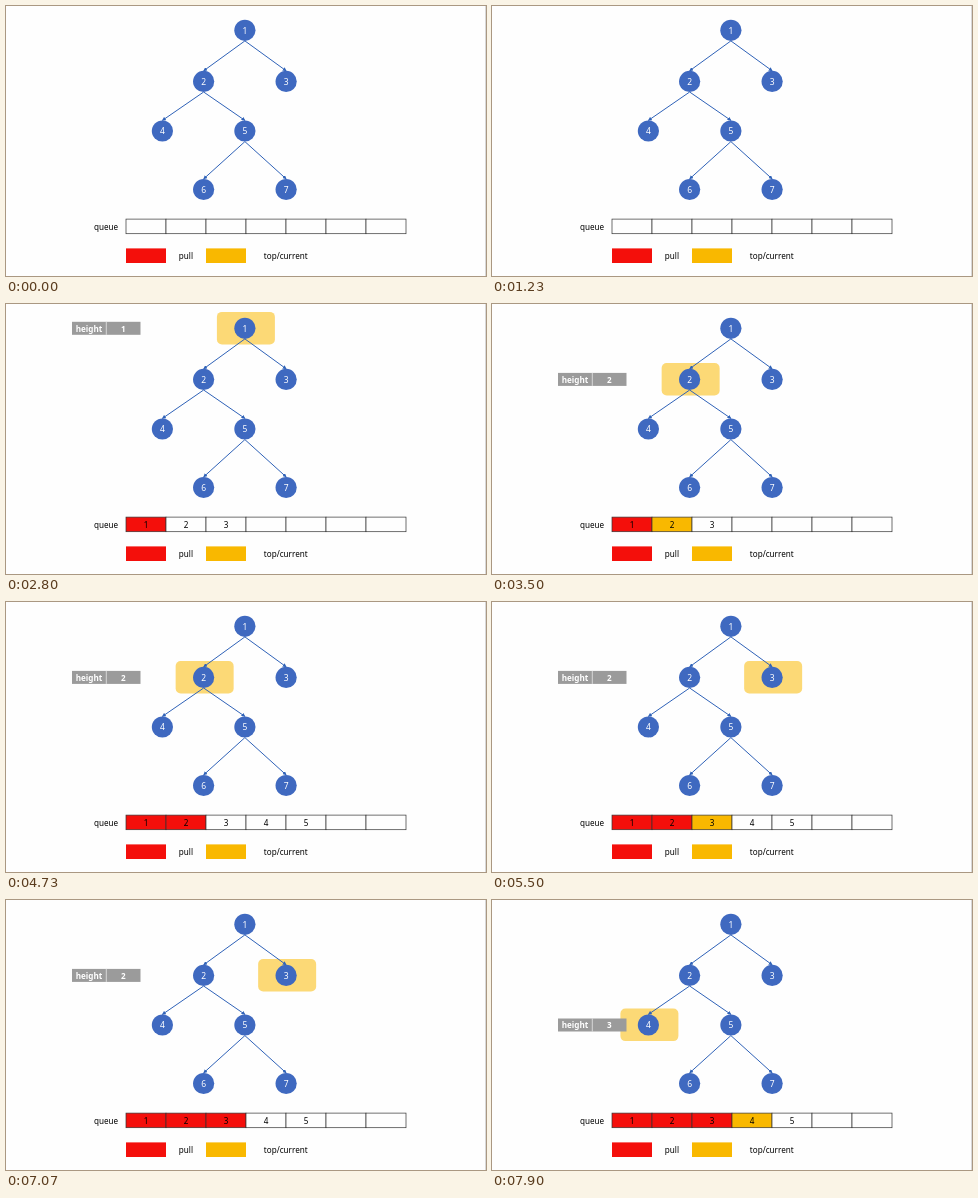
An HTML page for the animation above (8 s loop, 480 px wide and 270 px high).

```html
<!DOCTYPE html>
<html lang="en">
<head>
<meta charset="utf-8">
<title>Level-order traversal</title>
<style>
  html, body { margin: 0; width: 100%; height: 100%; overflow: hidden; background: #fefefe; }
  svg { display: block; width: 100vw; height: 100vh; font: 8.15px "Noto Sans", "Open Sans", sans-serif; }
  .mid { text-anchor: middle; }
  .node circle { fill: #3f69c0; }
  .node text { fill: #fff; font-size: 8.5px; }
  .edge { stroke: #2f62b8; stroke-width: 1; marker-end: url(#tip); }
  .cell rect { stroke: #333; stroke-width: .7; }
  .pulled { fill: #f40f0b; }
  .current { fill: #f9b800; }
  .waiting { fill: #fefefe; }
  #height rect { fill: #9b9b9b; }
  #height path { stroke: #e8e8e8; stroke-width: .8; }
  #height text { fill: #fff; font-weight: bold; }
</style>
</head>
<body>
<svg viewBox="0 0 480 270">
  <defs>
    <marker id="tip" markerUnits="userSpaceOnUse" markerWidth="4" markerHeight="4" refX="3.4" refY="2" orient="auto">
      <path d="M0 0L4 2L0 4Z" fill="#2f62b8"/>
    </marker>
  </defs>
  <rect x="479" width="1" height="270" fill="#d8d8d8"/>
  <g id="visit">
    <rect id="focus" y="-16.4" width="58" height="32.5" rx="5" fill="#fcd976"/>
  </g>
  <g id="tree"></g>
  <g id="height">
    <rect x="66" y="-6.5" width="68.5" height="13"/>
    <path d="M100.3 -6.5v13"/>
    <text class="mid" x="83" y="3.2">height</text>
    <text class="mid" id="level" x="117.3" y="3.2"></text>
  </g>
  <g id="queue"></g>
  <text x="88" y="223.8">queue</text>
  <rect class="pulled" x="120" y="242.4" width="40" height="14.6"/>
  <text x="172.8" y="252.8">pull</text>
  <rect class="current" x="200" y="242.4" width="40" height="14.6"/>
  <text x="257.8" y="252.8">top/current</text>
</svg>
<script>
const LOOP = 8000, STEP = 1000, START = 1400;
const SPREAD = 41.25, RADIUS = 10.6;
const rowY = [24.3, 75.4, 125, 183.5];
const children = { 1: [2, 3], 2: [4, 5], 5: [6, 7] };
const get = id => document.getElementById(id);

// Breadth-first order: each node hangs to the left or right of its parent
const nodes = [{ id: 1, x: 238.9, row: 0 }];
for (const node of nodes) {
  (children[node.id] || []).forEach((id, side) =>
    nodes.push({ id, parent: node, x: node.x + (side ? SPREAD : -SPREAD), row: node.row + 1 }));
}

const drawEdge = ({ parent, x, row }) => parent
  ? `<line class="edge" x1="${parent.x}" y1="${rowY[parent.row] + RADIUS}" x2="${x}" y2="${rowY[row] - RADIUS}"/>`
  : '';
const drawNode = ({ id, x, row }) =>
  `<g class="node"><circle cx="${x}" cy="${rowY[row]}" r="${RADIUS}"/>
   <text class="mid" x="${x}" y="${rowY[row] + 3.2}">${id}</text></g>`;
const drawCell = (_, i) =>
  `<g class="cell"><rect x="${120 + i * 40}" y="213.1" width="40" height="14.6"/>
   <text class="mid" x="${140 + i * 40}" y="223.6"></text></g>`;

get('tree').innerHTML = nodes.map(drawEdge).join('') + nodes.map(drawNode).join('');
get('queue').innerHTML = nodes.map(drawCell).join('');
const cells = [...document.querySelectorAll('.cell')];

// Every node takes two steps: become current, then be pulled while its children join
function show(step) {
  const current = Math.ceil(step / 2) - 1, pulled = Math.floor(step / 2);
  const node = nodes[current];
  const done = nodes.slice(0, pulled);
  get('visit').style.visibility = get('height').style.visibility = node ? 'visible' : 'hidden';
  if (node) {
    const y = rowY[node.row];
    get('visit').setAttribute('transform', `translate(${node.x - 28} ${y})`);
    get('height').setAttribute('transform', `translate(0 ${y})`);
    get('level').textContent = node.row + 1;
  }
  cells.forEach((cell, i) => {
    const [box, label] = cell.children;
    const { id, parent } = nodes[i];
    const queued = parent ? done.includes(parent) : step > 0;
    box.setAttribute('class', i < pulled ? 'pulled' : i === current ? 'current' : 'waiting');
    label.textContent = queued ? id : '';
  });
}

let shown;
function tick() {
  const time = performance.now() % LOOP;
  const step = Math.max(0, Math.floor((time - START) / STEP) + 1);
  if (step !== shown) show(shown = step);
  requestAnimationFrame(tick);
}
tick();
</script>
</body>
</html>
```
